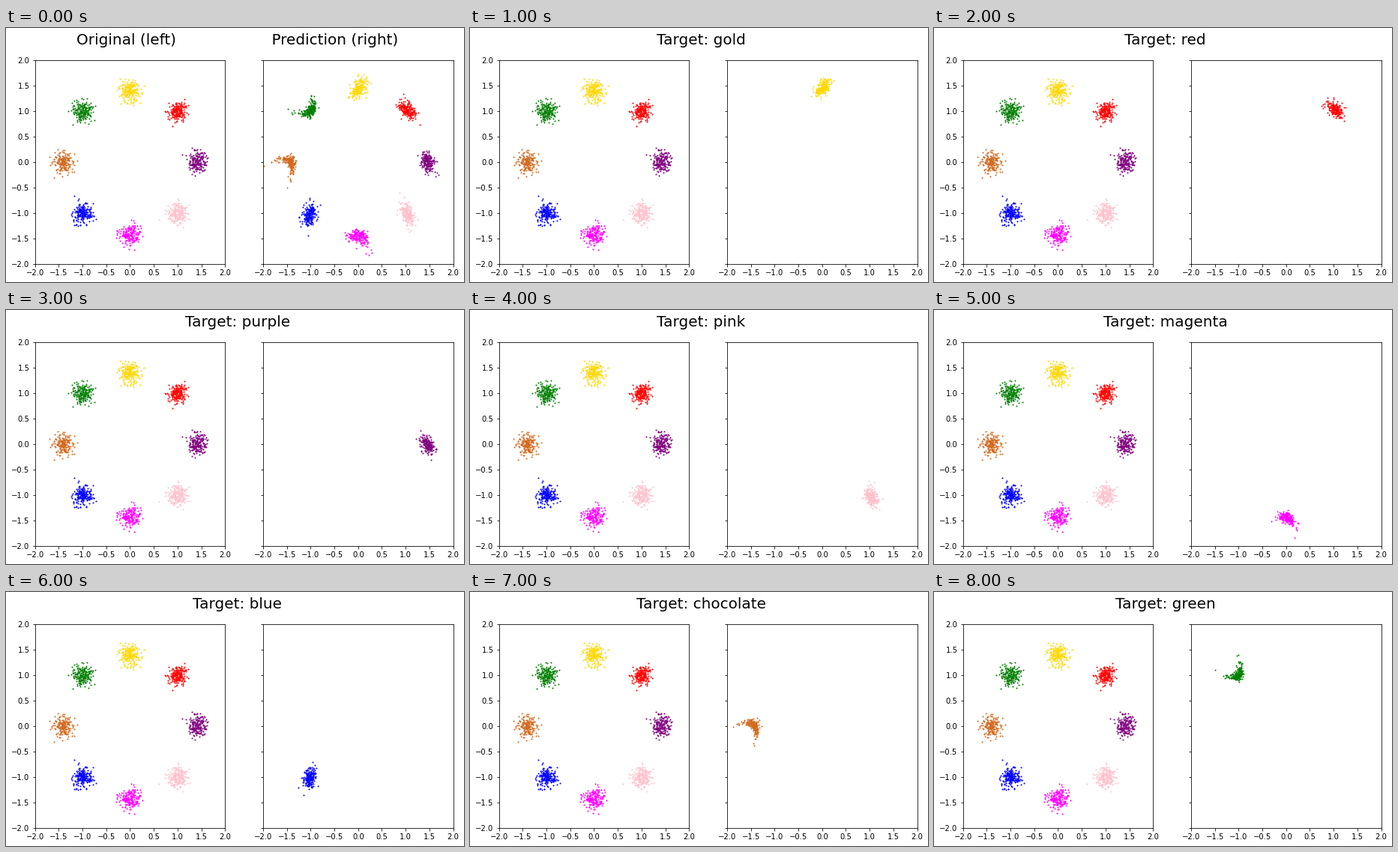
Write a matplotlib script that moves like this. It is 611 by 339 pixels and loops after 9000 ms.

```python
import numpy as np
import matplotlib.pyplot as plt
from matplotlib.animation import FuncAnimation

W, H, DPI = 611, 339, 72
COUNT = 200
SIGMA = 0.1

# Tilt in degrees and bend of each predicted cluster, clockwise from the top.
CLUSTERS = {
    "gold": (50, 0),
    "red": (-40, 0),
    "purple": (-65, 0),
    "pink": (-65, 0),
    "magenta": (-20, -0.02),
    "blue": (75, 0),
    "chocolate": (-45, -0.04),
    "green": (45, 0.04),
}

plt.rcParams.update({"font.family": "DejaVu Sans", "font.size": 10})


def center(i):
    angle = np.pi / 2 - i * np.pi / 4
    return np.sqrt(2) * np.array([np.cos(angle), np.sin(angle)])


def true_cluster(i):
    rng = np.random.default_rng(20 + i)
    return center(i) + SIGMA * rng.normal(size=(COUNT, 2))


def predicted_cluster(i, tilt, bend, scale, seed):
    """Oval cloud with a few strays, bent into an arc and turned."""
    rng = np.random.default_rng(seed + i)
    u, v = rng.normal(size=(2, COUNT)) * np.where(rng.random(COUNT) < 0.06, 1.5, 1)
    x = 1.1 * SIGMA * u
    y = 0.65 * SIGMA * v * (1 - 6 * abs(bend)) + bend * (u**2 - 1)
    c, s = np.cos(np.radians(tilt)), np.sin(np.radians(tilt))
    pull = 1.03  # predictions sit slightly outside the true ring
    return pull * center(i) + scale * np.column_stack([c * x - s * y, s * x + c * y])


def make_axes(left, right, labels):
    ax = fig.add_axes([left / W, 24 / H, (right - left) / W, 271.8 / H])
    ticks = np.arange(-2, 2.1, 0.5)
    ax.set(xlim=(-2, 2), ylim=(-2, 2), xticks=ticks, yticks=ticks)
    ax.tick_params(labelleft=labels)
    return ax


fig = plt.figure(figsize=((W + 1e-6) / DPI, (H + 1e-6) / DPI), dpi=DPI, facecolor="white")
left_ax = make_axes(38.6, 292.2, True)
right_ax = make_axes(342.9, 596.6, False)
title = fig.text(308.6 / W, 1 - 7.2 / H, "", size=20, ha="center", va="top")

joint, single = [], []
for i, (color, (tilt, bend)) in enumerate(CLUSTERS.items()):
    left_ax.scatter(*true_cluster(i).T, s=1, c=color)
    for group, scale, seed in ((joint, 1, 40), (single, 0.9, 60)):
        pts = predicted_cluster(i, tilt, bend, scale, seed)
        group.append(right_ax.scatter(*pts.T, s=1, c=color))

titles = ["Original (left)" + " " * 20 + "Prediction (right)"]
titles += [f"Target: {color}" for color in CLUSTERS]


def update(k):
    title.set_text(titles[k])
    for i, (together, alone) in enumerate(zip(joint, single), 1):
        together.set_visible(k == 0)
        alone.set_visible(k == i)
    return [title, *joint, *single]


anim = FuncAnimation(fig, update, frames=len(titles), interval=1000,
                     repeat=True, repeat_delay=0, blit=False)
plt.show()
```
